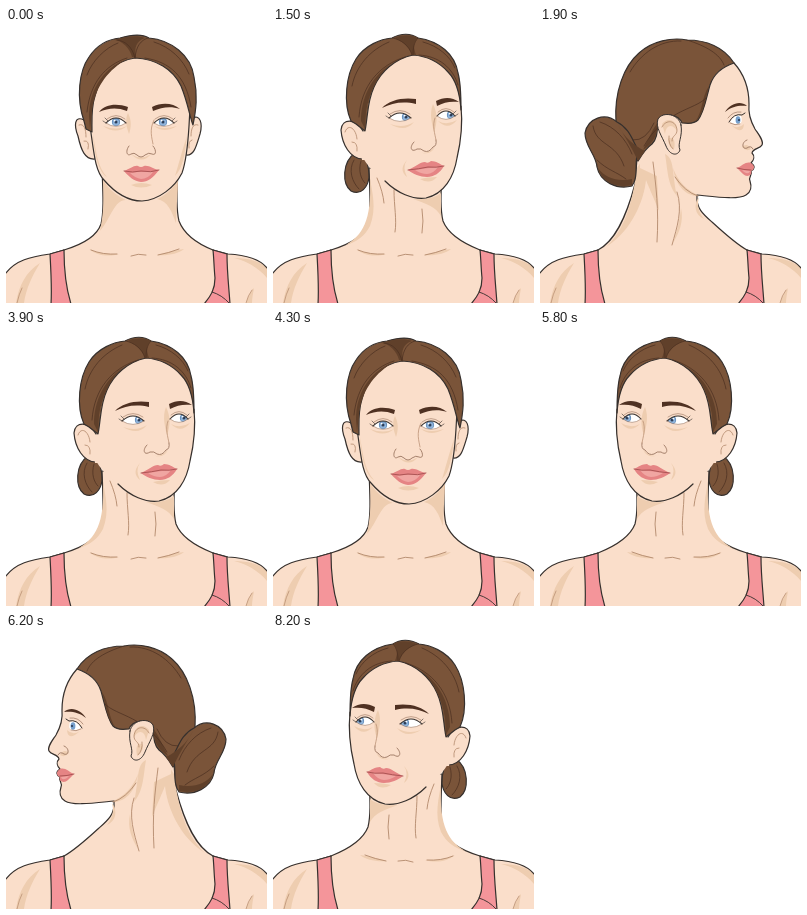
An HTML page with a canvas that plays this animation: 261x275 px, repeating every 8600 ms.

```html
<!DOCTYPE html>
<html lang="en">
<head>
<meta charset="utf-8">
<title>Head rotation</title>
<style>
html, body { margin: 0; width: 100%; height: 100%; overflow: hidden; background: #fff; }
canvas { display: block; width: 261px; height: 275px; }
</style>
</head>
<body>
<canvas id="stage" width="261" height="275"></canvas>
<script>
const ctx = document.getElementById('stage').getContext('2d');
const INK = '#36302d', SKIN = '#fadeca', SHADE = '#eecdb0', FOLD = '#b3896c';
const HAIR = '#7a5439', DARK = '#60402a', STRAND = '#4a2f20';
const PINK = '#f4959a', LIP = '#e58484', GLOSS = '#f0a6a2', BROW = '#4f3122';
const LOOP = 8600, MIRROR = 265;

function fill(color, ...paths) {
  ctx.fillStyle = color;
  for (const d of paths) ctx.fill(new Path2D(d));
}
function line(color, width, ...paths) {
  ctx.strokeStyle = color;
  ctx.lineWidth = width;
  for (const d of paths) ctx.stroke(new Path2D(d));
}
function shape(color, d, width = 1.2) {
  fill(color, d);
  line(INK, width, d);
}
function dot(color, x, y, r) {
  ctx.fillStyle = color;
  ctx.beginPath();
  ctx.arc(x, y, r, 0, 7);
  ctx.fill();
}

// dir: -1 puts the outer lashes on the left, 1 on the right
function eye(x, y, half, look, dir) {
  const lid = `M${x - half},${y + 1} Q${x},${y - 9} ${x + half},${y + 1}`;
  const almond = new Path2D(`${lid} Q${x},${y + 8} ${x - half},${y + 1}Z`);
  ctx.save();
  ctx.fillStyle = '#fff';
  ctx.fill(almond);
  ctx.clip(almond);
  dot('#648db9', x + look, y, 4.1);
  dot('#8fb4dc', x + look, y + .4, 3.2);
  dot('#2c3d57', x + look, y, 1.5);
  dot('#fff', x + look - 1.4, y - 1.4, .9);
  ctx.restore();
  line(INK, 1.1, lid);
  line('#9b7661', .6, `M${x - half},${y + 1} Q${x},${y + 8} ${x + half},${y + 1}`,
    `M${x - half + 1},${y - 3} Q${x},${y - 10} ${x + half - 1},${y - 3}`);
  const tip = x + dir * half;
  line(INK, .6, `M${tip},${y + 1} l${dir * 3},-2`, `M${tip - dir * 2},${y - 1} l${dir * 3},-3`);
}

function torso() {
  fill(SKIN, 'M0,245 C10,232 24,229 44,226 L58,222 L90,212 H175 L207,222 L222,226 C240,227 254,231 261,240 V275 H0Z');
  fill(SHADE, 'M10,275 C13,257 20,244 34,235 C26,248 20,261 18,275Z',
    'M228,230 C244,230 255,234 261,240 V250 C252,239 240,233 228,230Z',
    'M240,275 C242,268 244,264 248,260 C247,266 246,270 246,275Z');
  line(INK, 1.2, 'M0,245 C10,232 24,229 44,226 L58,222', 'M207,222 L222,226 C240,227 254,231 261,240');
  line(FOLD, .7, 'M11,275 Q13,266 16,260', 'M240,275 Q242,267 246,262');
  shape(PINK, 'M44,226 L58,222 C58,243 60,260 65,276 H45 C46,260 45,244 44,226Z');
  shape(PINK, 'M207,222 L221,226 C221,245 223,260 224,276 H198 C205,268 209,261 209,250 C208,240 208,232 207,222Z');
  line(INK, .9, 'M206,264 Q216,267 223,275');
}

function frontNeck(right) {
  shape(SKIN, `M58,222 C78,216 91,208 95,196 C98,183 97,166 96,140 H${right}
    C${right - 1},165 ${right - 2},180 ${right + 1},193 C${right + 6},206 192,216 207,222`);
}

function collarbones() {
  fill(SHADE, 'M83,221 C90,225 101,226 113,226 C103,229 91,228 83,221Z',
    'M151,227 C161,224 169,222 178,221 C172,226 161,228 151,227Z');
  line(FOLD, .9, 'M85,222 Q97,227 111,226', 'M125,228 Q132,225 140,227', 'M152,227 Q163,225 173,221');
}

function front() {
  frontNeck(172);
  fill(SHADE, 'M97,152 C103,162 113,169 120,172 C108,172 105,190 94,203 C98,184 98,168 97,152Z',
    'M172,152 C165,163 158,168 151,171 C162,173 166,184 170,195 C170,180 172,166 172,152Z');
  collarbones();
  shape(SKIN, 'M78,92 C68,87 68,98 72,108 C75,122 79,132 89,131 L88,100');
  shape(SKIN, 'M186,90 C194,86 197,95 194,106 C190,119 188,128 180,127 L180,98');
  line(FOLD, .8, 'M73,97 C78,95 80,101 80,109 M78,113 Q84,112 82,121',
    'M192,97 C187,95 185,101 185,108 M186,112 Q182,113 183,120');
  shape(SKIN, 'M84,98 C88,125 89,143 98,152 C110,166 122,173 136,173 C153,172 169,159 176,145 C181,131 182,114 183,98 L185,62 C175,36 150,24 129,24 C105,26 90,45 84,75Z');
  fill(SHADE, 'M87,106 C90,124 92,140 101,149 C92,144 88,124 87,106Z',
    'M181,108 C179,126 177,140 169,148 C173,135 176,123 181,108Z',
    'M97,98 Q110,107 121,98 Q111,103 97,98Z', 'M148,98 Q158,106 171,98 Q158,102 148,98Z',
    'M122,85 C126,93 125,100 123,106 C120,98 119,91 122,85Z',
    'M125,157 Q135,153 146,157 Q135,162 125,157Z', 'M125,126 Q135,133 145,126 Q136,137 125,126Z');
  shape(HAIR, 'M78,93 C70,70 73,43 83,29 C91,17 103,11 114,10 C124,7 135,5 143,10 C165,12 185,27 188,49 C192,68 190,82 187,97 C184,90 182,75 175,58 C167,41 150,31 129,30 C109,33 94,48 89,68 C85,80 86,91 86,104 L80,101Z');
  fill(DARK, 'M126,29 C124,20 116,13 109,12 C118,8 133,7 139,10 C130,13 128,20 130,29Z',
    'M83,88 C83,64 95,42 119,32 C99,45 89,61 86,83 L84,101Z');
  line(STRAND, .7, 'M129,30 C126,18 119,13 111,12', 'M129,30 C130,18 135,12 142,10',
    'M121,30 C99,37 84,55 81,84', 'M112,15 C99,20 86,33 81,47', 'M139,30 C164,34 180,48 185,79', 'M148,14 C164,19 177,31 183,46');
  fill(BROW, 'M93,84 C99,76 111,75 122,79 L121,83 C111,79 102,80 93,84Z',
    'M146,79 C156,74 167,75 174,81 C165,78 156,79 147,83Z');
  eye(110, 94, 10, 0, -1);
  eye(158, 94, 10, -1, 1);
  line('#9b7661', .9, 'M123,118 C119,123 121,129 125,126 Q128,124 131,127 Q135,131 139,127 Q143,124 146,126 C151,128 150,121 147,118');
  line(FOLD, .7, 'M148,92 C143,102 146,110 147,116');
  fill(LIP, 'M118,143 C124,141 128,137 132,138 Q135,140 138,138 C143,137 147,141 153,142 C147,150 142,154 135,154 C128,153 123,149 118,143Z');
  fill(GLOSS, 'M124,145 Q135,143 147,144 Q142,151 135,151 Q129,150 124,145Z');
  line('#9e4a4a', .8, 'M118,143 Q127,145 135,143 Q145,145 153,142');
}

function threeQuarter() {
  frontNeck(169);
  fill(SHADE, 'M97,150 C99,164 104,180 97,198 C92,208 82,215 73,217 C89,207 99,194 97,150Z',
    'M140,171 C152,172 162,170 168,165 L168,188 C163,179 154,176 140,171Z');
  line(FOLD, .9, 'M121,162 C121,178 124,192 122,204', 'M149,181 Q151,193 149,205', 'M104,150 Q110,164 111,175');
  collarbones();
  shape(HAIR, 'M82,125 C69,134 69,156 78,163 C88,168 95,159 96,149 C96,138 94,131 89,126Z');
  line(STRAND, .7, 'M81,132 C75,142 79,154 86,161', 'M88,133 C85,143 88,151 92,155');
  fill(SKIN, 'M90,95 L89,128 C94,138 102,145 109,151 C122,164 140,171 153,170 C171,166 181,149 184,130 C188,113 190,98 188,78 C184,45 165,24 139,22 C115,26 95,45 90,95Z');
  line(INK, 1.2, 'M112,153 C124,165 140,172 153,170 C171,166 181,149 184,130 C188,113 190,98 188,78');
  shape(SKIN, 'M90,103 C83,90 69,90 68,102 C69,116 77,131 90,131');
  fill(SKIN, 'M85,104 H95 V132 H89Z');
  line(FOLD, .8, 'M72,104 C75,95 83,100 84,111', 'M79,114 Q85,114 84,123');
  fill(SHADE, 'M117,96 Q130,101 141,94 Q132,105 117,96Z', 'M165,93 Q174,98 184,92 Q175,103 165,93Z',
    'M147,151 Q154,149 164,149 Q157,157 147,151Z', 'M143,122 Q152,129 162,119 Q156,130 143,122Z',
    'M160,76 C156,86 159,96 161,104 C165,94 164,84 160,76Z', 'M134,132 Q129,139 134,149 Q125,142 134,132Z');
  shape(HAIR, 'M83,96 L78,93 C70,75 73,47 83,31 C92,17 108,11 119,10 C128,5 138,5 145,10 C166,13 182,26 185,45 C188,56 188,69 188,82 C187,67 183,52 175,44 C165,33 153,28 140,27 C122,31 108,43 101,59 C94,74 95,88 92,103Z');
  fill(DARK, 'M139,27 C137,20 130,13 121,10 C130,6 140,7 145,10 C139,15 141,21 143,27Z',
    'M88,93 C88,70 98,50 116,37 C105,48 96,64 93,84 L92,101Z');
  line(STRAND, .7, 'M139,27 C136,17 128,12 120,10', 'M132,29 C106,37 88,58 86,89', 'M116,14 C97,22 83,38 79,58',
    'M140,27 C140,20 141,14 145,10', 'M146,27 C166,28 180,40 185,57', 'M150,14 C165,18 177,28 182,40');
  fill(BROW, 'M109,80 C116,72 130,69 143,71 L143,76 C130,73 119,75 109,80Z',
    'M163,73 C171,69 179,69 186,74 C178,73 171,74 164,78Z');
  eye(127, 89, 11, 6, -1);
  eye(173, 87, 9, 5, 1);
  line('#9b7661', .9, 'M141,114 C136,119 138,125 144,121 Q148,120 151,123 Q156,125 160,119 Q164,118 163,112');
  line(FOLD, .7, 'M162,90 C159,98 162,106 163,112');
  fill(LIP, 'M135,142 C142,139 147,134 152,134 Q155,136 158,133 C163,133 167,136 171,138 C167,145 161,149 154,149 C147,149 140,146 135,142Z');
  fill(GLOSS, 'M142,142 Q154,140 165,139 Q160,146 154,146 Q148,146 142,142Z');
  line('#9e4a4a', .8, 'M135,142 Q146,141 155,139 Q163,140 171,138');
}

function profile() {
  shape(SKIN, 'M58,222 C75,213 86,190 95,156 L97,130 H160 L157,168 C156,180 163,186 172,194 C184,205 196,216 207,222');
  fill(SHADE, 'M97,140 L112,118 C118,136 117,160 119,183 C113,168 109,160 106,152 C104,172 92,203 66,219 C83,203 92,180 97,140Z',
    'M159,169 C153,177 155,187 164,191 C158,184 157,176 159,169Z',
    'M141,180 C144,194 139,205 133,215 C137,203 140,192 141,180Z');
  const face = 'M194,35 C203,45 209,60 209,76 C208,86 211,94 215,101 C219,107 224,113 222,117 C220,121 213,120 212,125 C215,128 214,132 211,135 C216,138 214,142 211,143 C213,146 208,149 210,153 C212,159 211,164 206,167 C198,172 177,169 157,167';
  fill(SKIN, face + ' L100,140 V100 L110,60Z');
  fill(SHADE, 'M125,126 C135,130 132,148 137,168 L141,172 C127,160 128,143 125,126Z',
    'M133,140 C138,154 148,163 160,168 C148,169 136,160 133,140Z',
    'M191,97 Q198,102 204,96 Q203,108 191,97Z', 'M202,119 Q207,114 211,121 Q206,124 202,119Z');
  line(INK, 1.2, face);
  line(FOLD, .9, 'M113,134 C116,158 119,181 117,214', 'M137,164 C143,182 137,199 132,217', 'M135,149 Q145,164 158,168');
  shape(HAIR, 'M194,35 C182,39 174,45 170,57 C166,71 164,85 158,92 C153,97 147,95 142,95 C139,87 123,83 118,92 C117,102 118,110 112,116 C105,121 101,128 98,133 C89,125 80,110 76,94 C74,64 84,38 99,25 C112,13 132,9 147,12 C166,12 184,19 194,35Z');
  shape(HAIR, 'M77,94 C65,84 48,90 45,105 C45,119 56,126 57,139 C60,154 77,162 92,158 C99,149 94,134 98,122 C92,111 89,100 77,94Z');
  fill(DARK, 'M78,97 C87,112 94,124 98,133 L105,123 C93,117 84,109 78,97Z',
    'M103,122 C109,110 113,100 119,93 C117,106 115,114 103,122Z',
    'M155,94 C163,84 161,70 169,58 C165,72 164,86 155,94Z',
    'M58,140 C65,150 78,154 92,151 L92,157 C76,161 61,153 58,140Z');
  line(STRAND, .7, 'M147,12 C166,18 180,26 184,37', 'M141,13 C120,12 101,25 90,44', 'M166,70 C155,82 124,82 104,118',
    'M114,95 Q106,113 93,112', 'M53,98 C56,118 76,114 84,138', 'M60,94 C75,99 86,111 92,126', 'M57,132 C67,142 77,144 86,151');
  shape(SKIN, 'M141,97 C139,86 123,83 118,91 C115,99 122,108 126,118 C130,128 138,128 140,122 C137,115 143,109 141,97Z', 1);
  fill(SHADE, 'M122,96 C128,88 138,93 137,103 C132,95 126,97 125,106Z', 'M128,111 C133,107 136,113 134,121 C130,120 128,116 128,111Z');
  line(FOLD, .8, 'M122,99 C126,91 136,92 137,102 C137,108 132,107 132,113', 'M129,108 Q128,116 133,121');
  fill(BROW, 'M185,84 C190,76 200,72 207,78 C200,77 192,78 185,84Z');
  fill('#fff', 'M190,94 Q195,85 201,88 Q203,93 200,96 Q195,97 190,94Z');
  ctx.fillStyle = '#76a0cd';
  ctx.beginPath();
  ctx.ellipse(198, 92, 2.4, 3.8, 0, 0, 7);
  ctx.fill();
  dot('#2c3d57', 199, 92, 1.1);
  line(INK, 1, 'M189,94 Q194,85 202,87 l3,-2');
  line('#9b7661', .7, 'M190,95 Q195,98 200,96', 'M188,90 Q193,83 201,84');
  line('#9b7661', .9, 'M207,112 C201,114 202,122 207,120 Q211,117 213,121');
  fill(LIP, 'M197,140 C202,138 206,133 211,135 C216,138 214,142 211,143 C213,147 207,150 203,146Z');
  fill(GLOSS, 'M202,142 L210,143 Q209,147 204,144Z');
  line('#9e4a4a', .8, 'M197,140 Q204,142 211,142');
}

const schedule = [
  [1500, front], [1900, threeQuarter], [3900, profile], [4300, threeQuarter],
  [5800, front], [6200, threeQuarter, true], [8200, profile, true], [LOOP, threeQuarter, true]
];

function draw(now) {
  const [, pose, mirrored] = schedule.find(([end]) => now % LOOP < end);
  ctx.fillStyle = '#fff';
  ctx.fillRect(0, 0, 261, 275);
  ctx.lineJoin = ctx.lineCap = 'round';
  torso();
  ctx.save();
  if (mirrored) ctx.transform(-1, 0, 0, 1, MIRROR, 0);
  pose();
  ctx.restore();
}

const start = performance.now();
function tick() {
  draw(performance.now() - start);
  requestAnimationFrame(tick);
}
tick();
</script>
</body>
</html>
```
